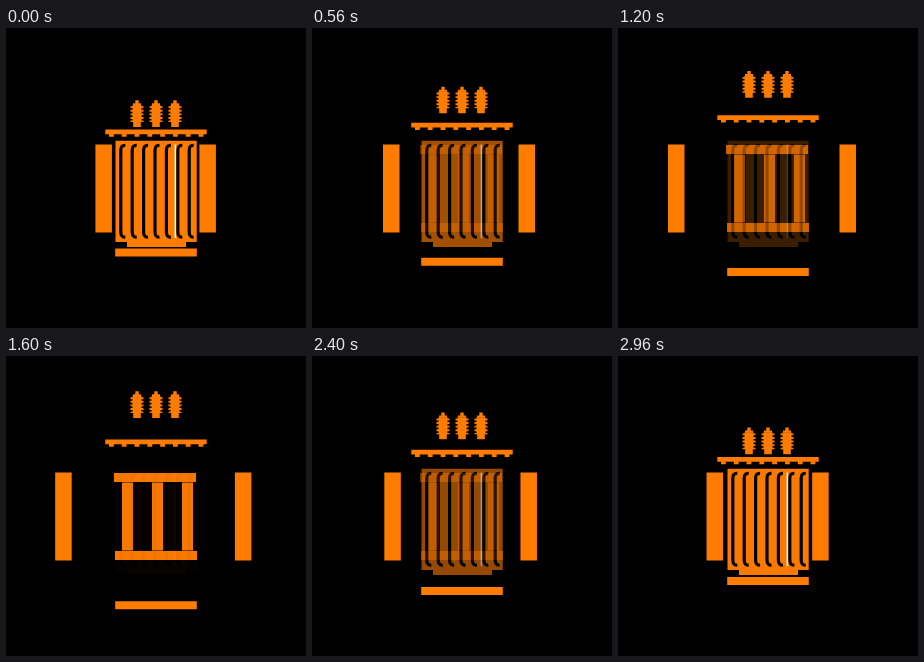
An HTML page for the animation above (3040 ms loop, 300x300 px).

```html
<!DOCTYPE html>
<html>
<head>
<meta charset="utf-8">
<style>
html, body { margin: 0; width: 100%; height: 100%; overflow: hidden; background: #000; }
svg { display: block; width: 100vw; height: 100vh; }
</style>
</head>
<body>
<svg viewBox="0 0 300 300" fill="#ff7c00">
  <defs>
    <g id="insulator">
      <path d="M-1.700 72.300h3.400v3h2.300v2h-8v-2h2.300z"/>
      <path d="M-4.500 77h9V94h-9zM-3.800 93.500h7.600V99h-7.600z"/>
      <path d="M0 78.200V94" stroke="#ff7c00" stroke-width="13" stroke-dasharray="1.900 1.700"/>
    </g>
    <path id="slot" d="M4.500 117.300Q0 117 0 122V204Q0 209.500 4.500 209" fill="none" stroke="#000" stroke-width="3.200"/>
  </defs>
  <g id="frame">
    <path d="M108 117h82v9h-82zM109 195h82v9h-82z"/>
    <path d="M116 126.500h11v68h-11zM146 126.500h11v68h-11zM176 126.500h11v68h-11z"/>
  </g>
  <g id="body">
    <path d="M109.500 112.700h81.200V214H180v5h-59v-5h-11.500z"/>
    <g id="slots"></g>
    <path d="M168.600 116.500h1.500V210h-1.500z" fill="#fff"/>
  </g>
  <g id="bushings">
    <use href="#insulator" x="131"/>
    <use href="#insulator" x="150"/>
    <use href="#insulator" x="169"/>
  </g>
  <g id="lid">
    <path d="M99.300 101.500h101.400v4.700H99.300z"/>
    <path d="M103 107.200H199" stroke="#ff7c00" stroke-width="3" stroke-dasharray="4.800 8"/>
  </g>
  <path id="left" d="M89.400 116.500h16.500v88H89.400z"/>
  <path id="right" d="M193.400 116.500h16.500v88h-16.500z"/>
  <path id="base" d="M109.200 220.500h81.600v8h-81.600z"/>
</svg>
<script>
const LOOP = 3040, STEP = 80, END = 2990;
const $ = id => document.getElementById(id);

$('slots').innerHTML = Array.from({ length: 7 }, (_, i) =>
  `<use href="#slot" x="${114.8 + i * 11.4}"/>`).join('');

// Linear rise to 1 at the peak, then linear return to 0
const ramp = (t, peak) => Math.max(0, t < peak ? t / peak : (END - t) / (END - peak));

const move = (id, x, y) => $(id).setAttribute('transform', `translate(${x} ${y})`);

function draw(now) {
  const t = Math.floor(now % LOOP / STEP) * STEP;
  const k = ramp(t, 1560);
  move('bushings', 0, -38 * k);
  move('lid', 0, -18.5 * k);
  move('base', 0, 25.5 * k);
  move('right', 36.5 * k, 0);
  move('left', -46 * ramp(t, 1400), 0);
  $('body').setAttribute('opacity', 1 - k);
  $('frame').setAttribute('opacity', k);
}

const start = performance.now();
function tick() {
  draw(performance.now() - start);
  requestAnimationFrame(tick);
}
tick();
</script>
</body>
</html>
```
